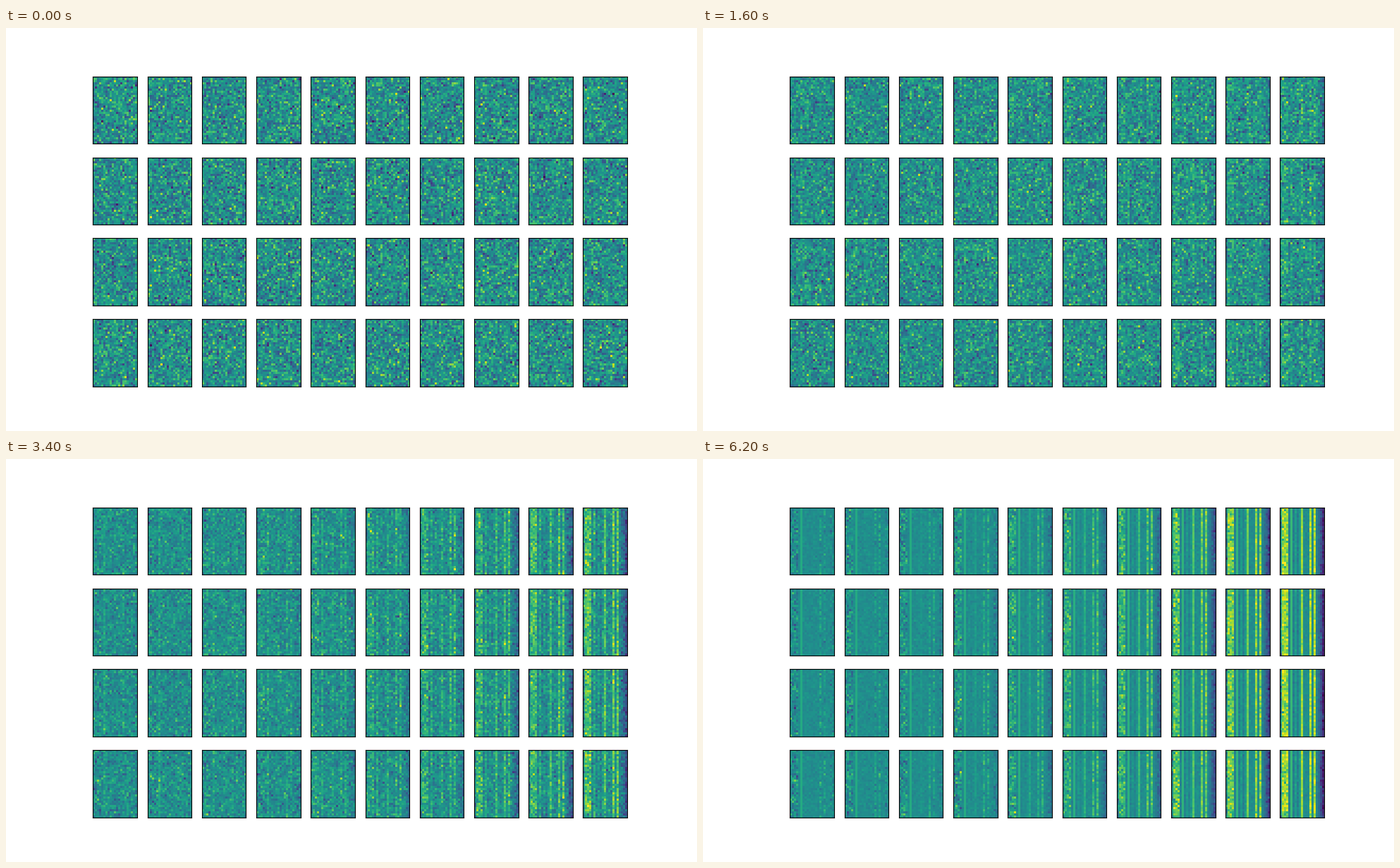
A matplotlib script that plays this animation: 980x572 px, repeating every 6.4 s.

```python
import numpy as np
import matplotlib.pyplot as plt
from matplotlib.animation import FuncAnimation

FRAMES, INTERVAL = 32, 200
GRID_ROWS, GRID_COLS = 4, 10
SAMPLES, FEATURES = 32, 21
LIMIT = 3.7  # the colour map runs from -LIMIT to LIMIT

rng = np.random.default_rng(7)


def clean_panels():
    """Striped panels whose pattern strengthens from left to right."""
    col = np.arange(FEATURES)
    stripes = np.isin(col, [10, 14, 16])
    plateau = abs(col - 2) < 1.5
    tail = np.clip((col - 16) / 4, 0, 1) ** 1.5
    ripple = -.06 * np.cos(np.pi * col) * (col > 3) * (col < 10)
    pattern = .36 * (plateau | stripes) + ripple - .38 * tail

    base = -.01 + .12 * (col == 5) + .04 * (col > 13) * stripes
    spread = .025 + .075 * (col < 4) + .04 * (col > 13) * stripes
    spread = (spread + .03 * (col > 18)) * (col != 5)

    gain = np.linspace(0, 1, GRID_COLS) ** 1.7
    levels = base + gain[:, None] * pattern
    shape = (GRID_ROWS, GRID_COLS, SAMPLES, FEATURES)
    jitter = spread * rng.standard_normal(shape)
    return 2 * LIMIT * (levels[:, None, :] + jitter)


def denoise(clean):
    """Fade correlated noise into the clean panels."""
    noise = rng.standard_normal(clean.shape)
    states = []
    for p in np.linspace(0, 1, FRAMES):
        signal = np.sin(np.pi / 2 * p ** .85) ** 2
        states.append(signal * clean + np.sqrt(1 - signal) * noise)
        keep = .6 + .38 * p
        fresh = rng.standard_normal(clean.shape)
        noise = keep * noise + np.sqrt(1 - keep ** 2) * fresh
    return states


states = denoise(clean_panels())

fig, axes = plt.subplots(GRID_ROWS, GRID_COLS, figsize=(9.8, 5.72), dpi=100,
                         facecolor="white")
fig.subplots_adjust(left=.125, right=.9, bottom=.11, top=.88,
                    wspace=.2, hspace=.2)

images = {}
for cell, ax in np.ndenumerate(axes):
    ax.set(xticks=[], yticks=[])
    images[cell] = ax.imshow(states[0][cell], cmap="viridis", aspect=1.0028,
                             vmin=-LIMIT, vmax=LIMIT, interpolation="nearest")


def update(k):
    for cell, image in images.items():
        image.set_data(states[k][cell])
    return list(images.values())


anim = FuncAnimation(fig, update, frames=FRAMES, interval=INTERVAL,
                     repeat=True, repeat_delay=0, blit=False)
plt.show()
```
